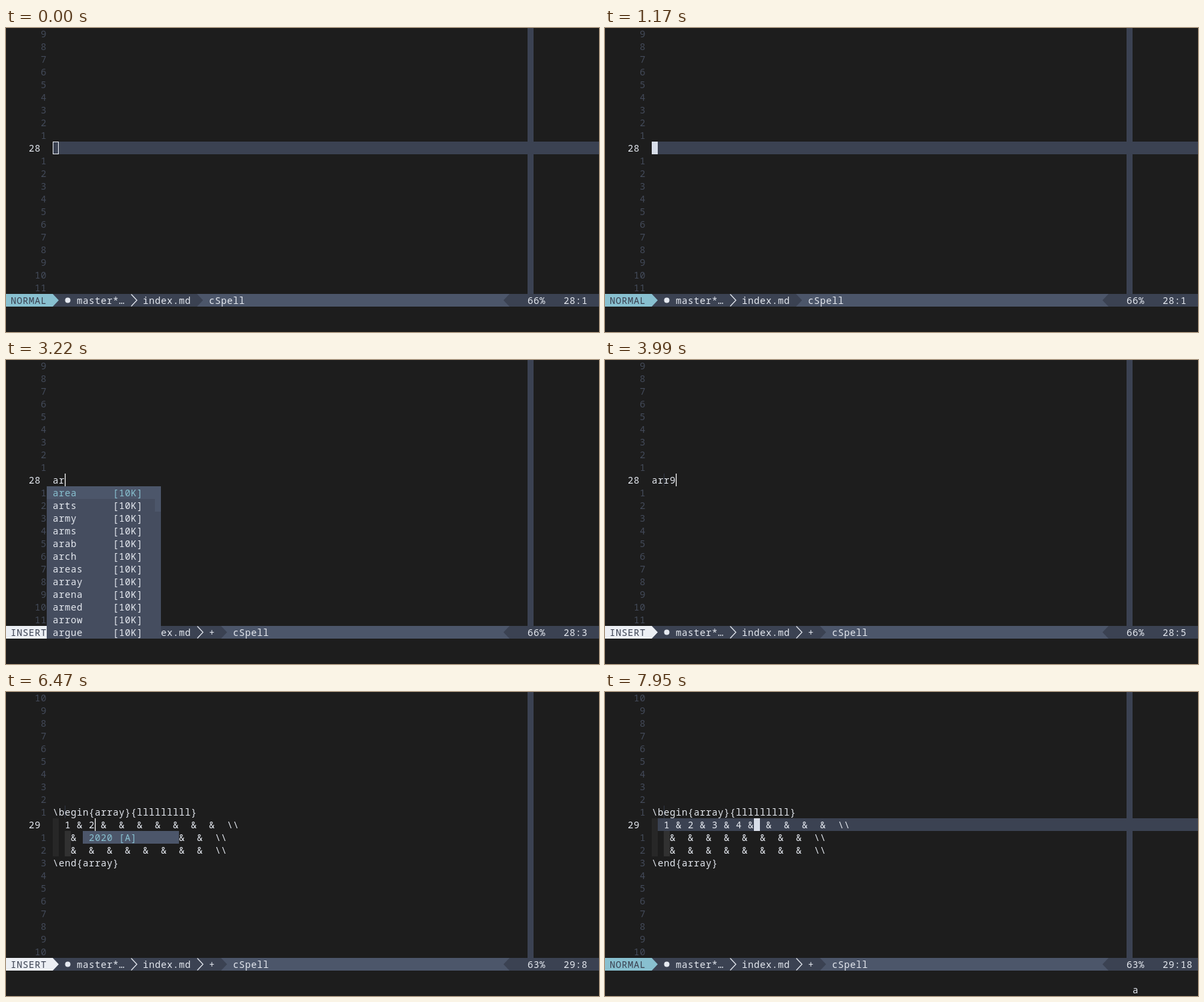
Write an HTML page that moves like this. It is 888 by 455 pixels and loops after 8000 ms.

```html
<!DOCTYPE html>
<html lang="en">
<head>
<meta charset="utf-8">
<title>Array snippet</title>
<style>
html, body { margin: 0; width: 100%; height: 100%; overflow: hidden; background: #1d1d1d; }
svg { display: block; width: 888px; height: 455px; }
text { white-space: pre; }
.cell { font: 14px "Noto Sans Mono", "DejaVu Sans Mono", monospace; letter-spacing: .6px; }
.ui { font: 11.3px "Open Sans", "Noto Sans", sans-serif; }
.mono { font: 11px "Liberation Mono", monospace; }
</style>
</head>
<body>
<svg id="stage" viewBox="0 0 888 455"></svg>
<script>
const LOOP = 8000;
const BG = '#1d1d1d', DARK = '#3b4252', MID = '#4c566a', MENU = '#454d5f',
      FG = '#e5e9f0', CYAN = '#88c0d0', NUM = '#434a59';

const WORDS = {
  a: 'and are all any also about after area april add access around',
  ar: 'area arts army arms arab arch areas array arena armed arrow argue',
  arr: 'array arrow arrest arrive arrival arrange arrived arrives arranged arriving arrested arrivals'
};

// Each step changes part of the editor state and keeps the rest.
const steps = [
  [0,    { mode: 'NORMAL', cursor: 'hollow', line: 28, col: 1, typed: '', key: '' }],
  [1120, { switcher: true }],
  [1170, { switcher: false, cursor: 'block' }],
  [1850, { key: 'a' }],
  [1880, { key: '', mode: 'INSERT', cursor: 'bar' }],
  [3100, { typed: 'a', col: 2 }],
  [3130, { menu: 'a' }],
  [3220, { typed: 'ar', col: 3, menu: 'ar' }],
  [3250, { typed: 'arr', col: 4, menu: 'arr', trace: true }],
  [3960, { typed: 'arr9', col: 5 }],
  [3990, { menu: '' }],
  [4300, { typed: 'arr93' }],
  [4350, { col: 6 }],
  [4980, { cells: 0, line: 29, col: 3 }],
  [5850, { cells: 1, col: 4 }],
  [6270, { col: 7 }],
  [6440, { cells: 2, col: 8 }],
  [6470, { year: true }],
  [6720, { year: false, col: 11 }],
  [6820, { cells: 3, col: 12 }],
  [7180, { col: 15 }],
  [7620, { cells: 4, col: 16 }],
  [7950, { mode: 'NORMAL', cursor: 'block', col: 18, key: 'a' }]
];
let last = {};
const states = steps.map(([, change]) => last = { ...last, ...change });

const X = k => 9 * k - 2;
const Y = row => 19 * row - 1;
const esc = s => String(s).replace(/&/g, '&amp;').replace(/</g, '&lt;');
const rect = (x, y, w, h, fill, more = '') =>
  `<rect x="${x}" y="${y}" width="${w}" height="${h}" fill="${fill}" ${more}/>`;
const circle = (x, y, r, fill) => `<circle cx="${x}" cy="${y}" r="${r}" fill="${fill}"/>`;
const block = (k, row, w, h, fill) => rect(X(k), Y(row), 9 * w, 19 * h, fill);
const put = (k, row, s, fill = FG) =>
  `<text class="cell" x="${X(k)}" y="${Y(row) + 15}" fill="${fill}">${esc(s)}</text>`;
const label = (x, y, s) => `<text class="ui" x="${x}" y="${y}" fill="#fff">${esc(s)}</text>`;
const tiny = (x, y, s, fill = '#333', kind = 'ui', scale = 1 / 3) =>
  `<text class="${kind}" transform="translate(${x} ${y}) scale(${scale})" fill="${fill}">${esc(s)}</text>`;

// Powerline separators; dir is 1 for right, -1 for left.
function wedge(k, fill, dir = 1) {
  const x = dir > 0 ? X(k) : X(k + 1);
  return `<path d="M${x} 398l${9 * dir} 9.5l${-9 * dir} 9.5z" fill="${fill}"/>`;
}
const chevron = k =>
  `<path d="M${X(k) + .5} 398.5l8.5 9l-8.5 9" fill="none" stroke="${FG}" stroke-width="1.2"/>`;

function tableRow(filled) {
  const cells = Array.from({ length: 9 }, (_, i) => i < filled ? i + 1 : '');
  return '  ' + cells.join(' & ') + ' \\\\';
}

function numbers(cur, line) {
  let out = '';
  for (let row = 0; row < 21; row++) {
    const n = String(Math.abs(row - cur));
    out += row === cur ? put(4, row, line, FG) : put(7 - n.length, row, n, NUM);
  }
  return out;
}

function statusLine(s) {
  const modeBg = s.mode === 'NORMAL' ? CYAN : '#eceff4';
  const changed = s.typed !== '';
  const end = changed ? 36 : 32;
  return rect(0, 398, 888, 19, DARK) +
    rect(0, 398, X(8), 19, modeBg) + put(1, 21, s.mode, DARK) + wedge(8, modeBg) +
    circle(92.5, 407.5, 4, FG) + put(12, 21, 'master*…') + chevron(21) +
    put(23, 21, 'index.md') + (changed ? chevron(32) + put(34, 21, '+') : '') +
    block(end, 21, 84 - end, 1, MID) + wedge(end, DARK) + put(end + 2, 21, 'cSpell') +
    wedge(83, DARK, -1) +
    put(87, 21, s.line === 28 ? '66%' : '63%') + put(93, 21, s.line + ':' + s.col);
}

function wordMenu(prefix) {
  let out = block(7, 10, 19, 12, MENU) + block(7, 10, 19, 1, MID) + block(25, 10, 1, 2, MID);
  WORDS[prefix].split(' ').forEach((word, i) => {
    const fill = i ? FG : CYAN;
    out += put(8, 10 + i, word, fill) + put(18, 10 + i, '[10K]', fill);
  });
  return out;
}

function cursorShape(kind, x, y) {
  if (kind === 'bar') return rect(x, y, 1.2, 19, '#fff');
  if (kind === 'block') return rect(x, y, 9, 19, '#d8dee9');
  return rect(x + .5, y + .5, 8, 18, 'none', `stroke="${FG}"`);
}

function terminal(s) {
  const cur = s.line - 19;
  const table = s.cells !== undefined;
  const lines = table
    ? ['\\begin{array}{lllllllll}', tableRow(s.cells), tableRow(0), tableRow(0), '\\end{array}']
    : [s.typed];
  let out = rect(0, 0, 888, 455, BG) + rect(781, 0, 9, 398, DARK);
  if (s.mode === 'NORMAL') out += rect(70, Y(cur), 818, 19, DARK);
  if (table) {
    out += block(8, 10, 1, 3, '#272727');
    for (let i = 1; i < 4; i++) if (lines[i][2] === ' ') out += block(10, 9 + i, 1, 1, '#313131');
  }
  if (s.trace) out += rect(88, 170, 1, 19, '#2f3644');
  out += numbers(cur, s.line);
  lines.forEach((line, i) => out += put(8, 9 + i, line));
  out += cursorShape(s.cursor, X(7 + s.col), Y(cur)) + statusLine(s);
  if (s.menu) out += wordMenu(s.menu);
  if (s.year) out += block(13, 11, 16, 1, MID) + put(14, 11, '2020 [A]', CYAN);
  return out + put(88, 23, s.key);
}

function recorderWindow() {
  return rect(405, 153, 292.5, 169, '#fff') + rect(407, 163, 289, 148, BG) +
    tiny(408, 160, 'ScreenToGif', '#222', 'ui', .43) +
    rect(660, 154.5, 15, 7, '#222') + tiny(662, 160, '00:01', '#f33', 'ui', .4) +
    tiny(679, 160, '—', '#777') + tiny(689, 160, '×', '#555', 'ui', .5) +
    circle(574, 316.5, 3, '#ccc') + circle(583, 316.5, 2, '#888') + circle(595, 316.5, 4.5, '#e9a95c') +
    tiny(603, 318.5, '30', '#777') + tiny(615, 318.5, 'fps', '#777') +
    tiny(628, 318.5, '888  x  455  px', '#555', 'ui', .4) +
    rect(661, 314, 2, 5, '#2b7cc0') + rect(664, 314, 2, 5, '#2b7cc0') + tiny(668, 318.5, 'Pause', '#222') +
    rect(680, 314, 5.5, 5, '#2463a8') + tiny(687, 318.5, 'Stop', '#222');
}

function terminalWindow() {
  return rect(705, 120, 200, 207, 'none', 'stroke="#fff" stroke-width="2"') +
    rect(710, 153, 178, 169, '#1d1d1d') + rect(710, 153, 178, 10, '#292929') +
    rect(712, 156, 4, 4, '#c85a38') + tiny(719, 160, 'devon@DESK-QRT27: ~', '#aaa', 'ui', .4) +
    `<g transform="translate(710 165) scale(.3333)">${terminal(states[0])}</g>`;
}

function browserWindow() {
  let out = rect(413, 366, 228, 89, '#25242b') + rect(413, 372, 228, 5, '#39383f');
  for (let i = 0; i < 4; i++) {
    out += circle(418 + i * 53, 369, 1.3, i % 2 ? '#bbb' : '#d0493f') +
      tiny(421 + i * 53, 370.4, 'Exercise page', '#aaa', 'ui', .28);
  }
  out += rect(463, 373, 105, 3, '#51505a') + rect(413, 378, 31, 77, '#17171a') + rect(414, 402, 29, 1, '#c38a35');
  for (let i = 0; i < 6; i++) out += rect(415, 382 + i * 6, 10 + i * 7 % 15, 1, '#666');
  out += rect(445, 377, 193, 78, '#fff') + rect(445, 393, 193, 62, '#dce8e4') +
    tiny(447, 384, 'MyScriptworkHall', '#287f79', 'ui', .49) +
    tiny(463, 389, 'powered by', '#777', 'ui', .27) + circle(483, 388, 1.5, '#287f79') +
    tiny(515, 382, 'Introductory Programming Exercises', '#555', 'ui', .28) +
    tiny(536, 387, 'Chapter Section Four', '#666', 'ui', .28) +
    rect(628, 380, 3, 3, '#54a494') + rect(633, 380, 3, 3, '#54a494') +
    rect(450, 398, 45, 57, '#fff') + rect(450, 398, 45, 6, '#bccfca');
  for (let i = 0; i < 11; i++) {
    out += rect(454 + i % 3, 406 + i * 4.5, 1.5, 1.5, '#4d9a87') +
      tiny(458, 408 + i * 4.5, 'Section exercise ' + (i + 1), '#444', 'ui', .27);
  }
  return out + rect(499, 397, 136, 58, '#fff') + rect(499, 397, 136, 6, '#548b7e') +
    rect(502, 407, 17, 5, '#c8dbd6') + rect(499, 412, 136, .6, '#aaa') +
    tiny(504, 424, 'Write a statement that finds the value in the given array and', '#333', 'ui', .29) +
    tiny(504, 429, 'stores its position in the variable result.', '#333', 'ui', .29) +
    rect(504, 436, 124, 12, '#fff', 'stroke="#bbb" stroke-width=".6"') +
    rect(503, 450, 10, 4, '#3b8c58') + tiny(560, 409, 'Work Area', '#555', 'ui', .3);
}

function notesWindow() {
  const bullets = ['Once stops stepping through each element in array',
    'Compares each element with the search value', 'Stops when the value is found or the end is reached',
    'Returns index of match value or -1 if search wasn\'t present'];
  const code = ['#include <iostream>', '#include <string>', 'using namespace std;', '',
    'int linearSearch(string target, string array[], int size);', '', '', 'int main(){',
    '    string books[] = {"To Hold a Lanternfish",',
    '        "The Oak Valley Reader", "A Quiet Ledger of Moss" };',
    '    int result = linearSearch("A Quiet Ledger of Moss", books, 3);',
    '    cout << "The search value is at position. " << result << endl;'];
  let out = rect(655, 366, 233, 89, '#fff') + rect(655, 366, 233, 8, '#e7e5f3') +
    circle(659, 370, 1.8, '#239ed9') +
    tiny(663, 371.5, '/home/devon/Docs/wiki/school/files/fall-2020/CSC/chapter-8/chapter-8-notes.pdf', '#444', 'ui', .3);
  bullets.forEach((s, i) => out += circle(686, 379 + i * 5, .7, '#5b3fa0') +
    tiny(689, 380.3 + i * 5, s, '#5b3fa0', 'ui', .32));
  out += rect(676.5, 398.5, 161, 70, '#fff', 'stroke="#555" stroke-width=".8"');
  code.forEach((s, i) => out += tiny(680, 403.5 + i * 4.52, s, '#111', 'mono'));
  return out;
}

function switcher() {
  return rect(378, 96, 510, 359, 'rgba(25,25,25,.96)') +
    rect(405, 128, 24, 18, '#c9c9c9') + label(434, 141.5, 'ScreenToGif') + recorderWindow() +
    rect(710, 126, 24, 22, '#d9623b') + label(739, 141.5, 'devon@DESK-QRT27: ~') + terminalWindow() +
    circle(425, 350, 11.5, '#f5842b') + label(442, 354.5, 'MyScriptworkHall - Tavorra...') + browserWindow() +
    circle(665, 350, 12, '#12a1e2') +
    label(682, 354.5, '/home/devon/Docs/wiki/school/files/fall') + notesWindow();
}

const stage = document.getElementById('stage');
let shown = -1;
function frame(now) {
  const t = now % LOOP;
  let i = steps.length - 1;
  while (steps[i][0] > t) i--;
  if (i !== shown) {
    shown = i;
    stage.innerHTML = terminal(states[i]) + (states[i].switcher ? switcher() : '');
  }
  requestAnimationFrame(frame);
}
frame(0);
</script>
</body>
</html>
```
